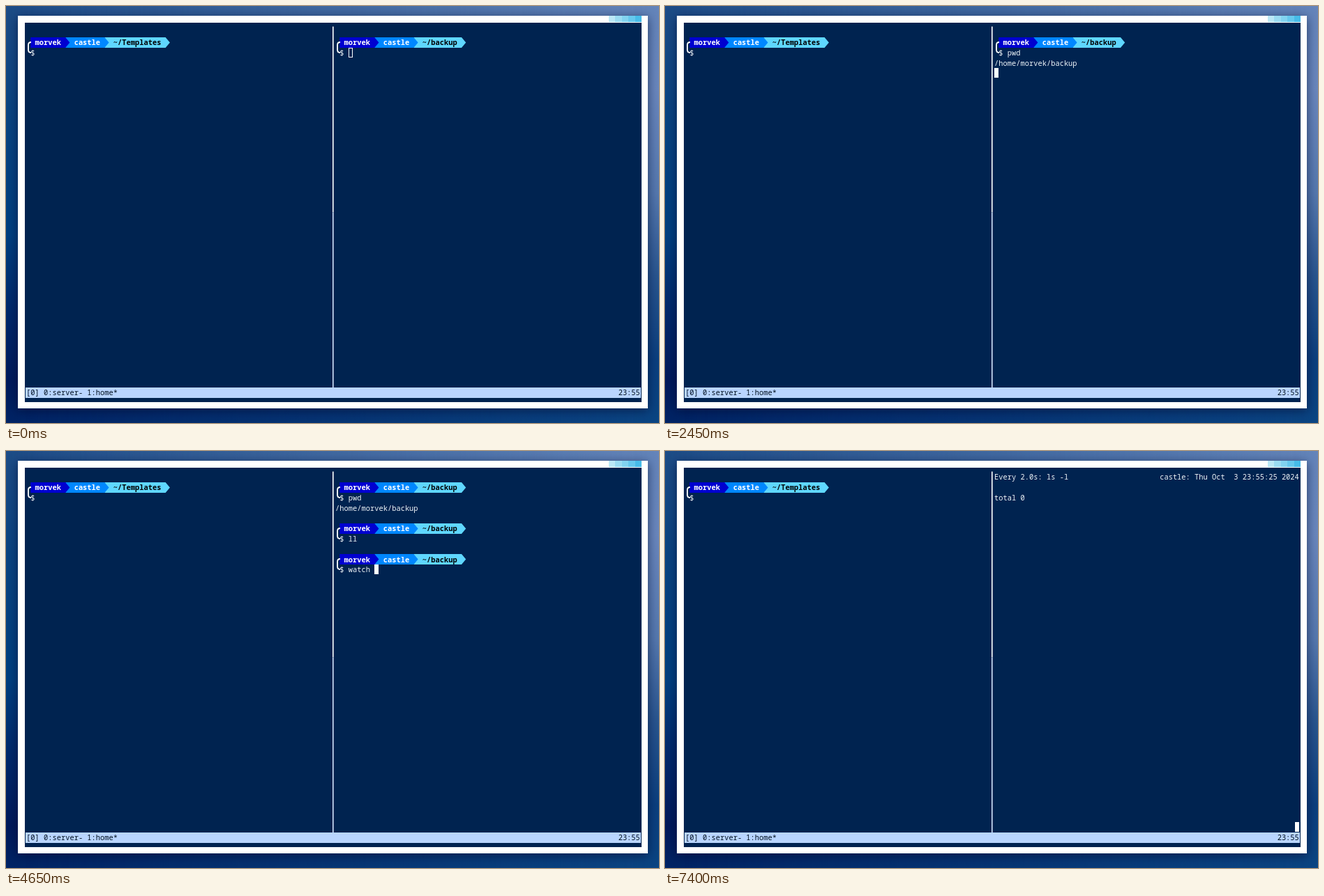
Animation of 936x599 px, one loop 8 s. Source, as an HTML page with a canvas:

```html
<!DOCTYPE html>
<html lang="en">
<head>
<meta charset="utf-8">
<title>Terminal</title>
<style>
  html, body { margin: 0; width: 100%; height: 100%; overflow: hidden; }
  div, canvas { position: absolute; }
  .wall { inset: 0; background: linear-gradient(#1d4c87, #0a4482 25%, #004080 55%, #002a6c 72%, #001a5c 90%, #002465); }
  .right { background: linear-gradient(#6485ba, #6a88bd 20%, #5578ae 45%, #28558f 65%, #0b3f7e 85%, #0a4583);
    -webkit-mask-image: linear-gradient(to right, transparent, #000); mask-image: linear-gradient(to right, transparent, #000); }
  .frame { left: 17px; top: 14px; width: 903px; height: 564px; background: #fff; box-shadow: 0 3px 14px rgba(0, 10, 45, .6); }
  .strip { left: 864px; top: 14px; width: 47px; height: 9px;
    background: linear-gradient(to right, #bce8f6 20%, #9bdcf2 0 40%, #82d3f0 0 60%, #66c8ed 0 80%, #47bce9 0); }
  .term { left: 27px; top: 23.5px; width: 884px; height: 545.5px; background: #002350; }
  canvas { left: 0; top: 0; }
</style>
</head>
<body>
<div class="wall"></div>
<div class="wall right"></div>
<div class="frame"></div>
<div class="strip"></div>
<div class="term"></div>
<canvas width="936" height="599"></canvas>
<script>
const ctx = document.querySelector('canvas').getContext('2d');
const CELL = 6.24, ROW = 14.81, LEFT = 29, TOP = 29.9, PANE = 71;
const LOOP = 8000, USER = 'morvek', FG = '#f0f4f8';

const colX = c => LEFT + c * CELL;
const rowY = r => Math.round(TOP + r * ROW);

function rect(x, y, w, h, color) {
  ctx.fillStyle = color;
  ctx.fillRect(x, y, w, h);
}

function text(str, col, row, color = FG, weight = 400) {
  ctx.font = `${weight} 10.4px "Noto Sans Mono", "DejaVu Sans Mono", monospace`;
  ctx.fillStyle = color;
  [...str].forEach((ch, i) => ctx.fillText(ch, colX(col + i), TOP + row * ROW + 11.2));
}

// One powerline segment: a bar ending in an arrow head; returns the next column.
function segment(str, col, row, from, bg, fg) {
  const y = rowY(row), h = rowY(row + 1) - y;
  const end = col + str.length + 1;
  ctx.fillStyle = bg;
  ctx.beginPath();
  ctx.moveTo(colX(from), y);
  ctx.lineTo(colX(end), y);
  ctx.lineTo(colX(end + 1), y + h / 2);
  ctx.lineTo(colX(end), y + h);
  ctx.lineTo(colX(from), y + h);
  ctx.fill();
  text(str, col, row, fg, 700);
  return end;
}

function prompt(col, row, path) {
  const first = col + 2, second = first + USER.length + 3, third = second + 9;
  segment(path, third, row, third - 2, '#5fd7ff', '#000');
  segment('castle', second, row, second - 2, '#0087ff', '#fff');
  segment(USER, first, row, first - 1, '#0000d0', '#fff');
  const x = colX(col) + 3, y = rowY(row) + 7;
  ctx.strokeStyle = '#fff';
  ctx.lineWidth = 1.8;
  ctx.beginPath();
  ctx.moveTo(x + 4, y);
  ctx.quadraticCurveTo(x, y, x, y + 4);
  ctx.lineTo(x, y + 11);
  ctx.quadraticCurveTo(x, y + 15, x + 4, y + 15);
  ctx.stroke();
}

function screen(content, col, path) {
  content.split('\n').forEach((line, row) =>
    line === '@' ? prompt(col, row, path) : text(line, col, row));
}

function cursor(content, hollow) {
  const lines = content.split('\n');
  const x = Math.round(colX(PANE + lines.at(-1).length)), y = rowY(lines.length - 1);
  if (!hollow) return rect(x, y, 6, 14, '#fff');
  ctx.strokeStyle = '#fff';
  ctx.lineWidth = 1;
  ctx.strokeRect(x + .5, y + .5, 5, 13);
}

// Screen contents; "@" marks a prompt line and the cursor sits at the end.
const PROMPT = '\n@\n $ ';
const printed = `${PROMPT}pwd\n/home/${USER}/backup\n`;
const second = printed + PROMPT;
const listed = second + 'll\n';
const third = listed + PROMPT;
const watching = 'Every 2.0s: ls -l'.padEnd(38) + 'castle: Thu Oct  3 23:55:25 2024' +
  '\n\ntotal 0' + '\n'.repeat(32) + ' '.repeat(69);

const steps = [[0, PROMPT]];
function type(base, str, times) {
  times.forEach((t, i) => steps.push([t, base + str.slice(0, i + 1)]));
}
type(PROMPT, 'pwd', [1550, 1575, 1600]);
steps.push([2400, PROMPT + 'pwd\n'], [2450, printed], [2550, second]);
type(second, 'll', [3000, 3050]);
steps.push([3200, listed], [3250, third]);
type(third, 'watch -n 2 ls -l', [3750, 3800, 3900, 3950, 4000, 4150,
  5000, 5250, 5450, 5700, 6150, 6400, 6500, 6650, 6800, 7000]);
steps.push([7200, third + 'watch -n 2 ls -l\n'], [7250, watching]);

function draw(now) {
  const t = now % LOOP;
  ctx.clearRect(0, 0, 936, 599);
  rect(468, 29.5, 1.6, 267, '#fff');
  rect(468, 296.5, 1.6, 251.5, '#d5e2fb');
  rect(28, 548, 882, 15, '#b9d5ff');
  text('[0] 0:server- 1:home*', 0, 35, '#001020');
  text('23:55', 136, 35, '#001020');
  screen('\n@\n $', 0, '~/Templates');

  const content = steps.findLast(step => step[0] <= t)[1];
  screen(content, PANE, '~/backup');
  const blinkedOff = t >= 6150 && t < 6400;
  if (!blinkedOff) cursor(content, t < 400);
  requestAnimationFrame(() => draw(performance.now()));
}
draw(0);
</script>
</body>
</html>
```
